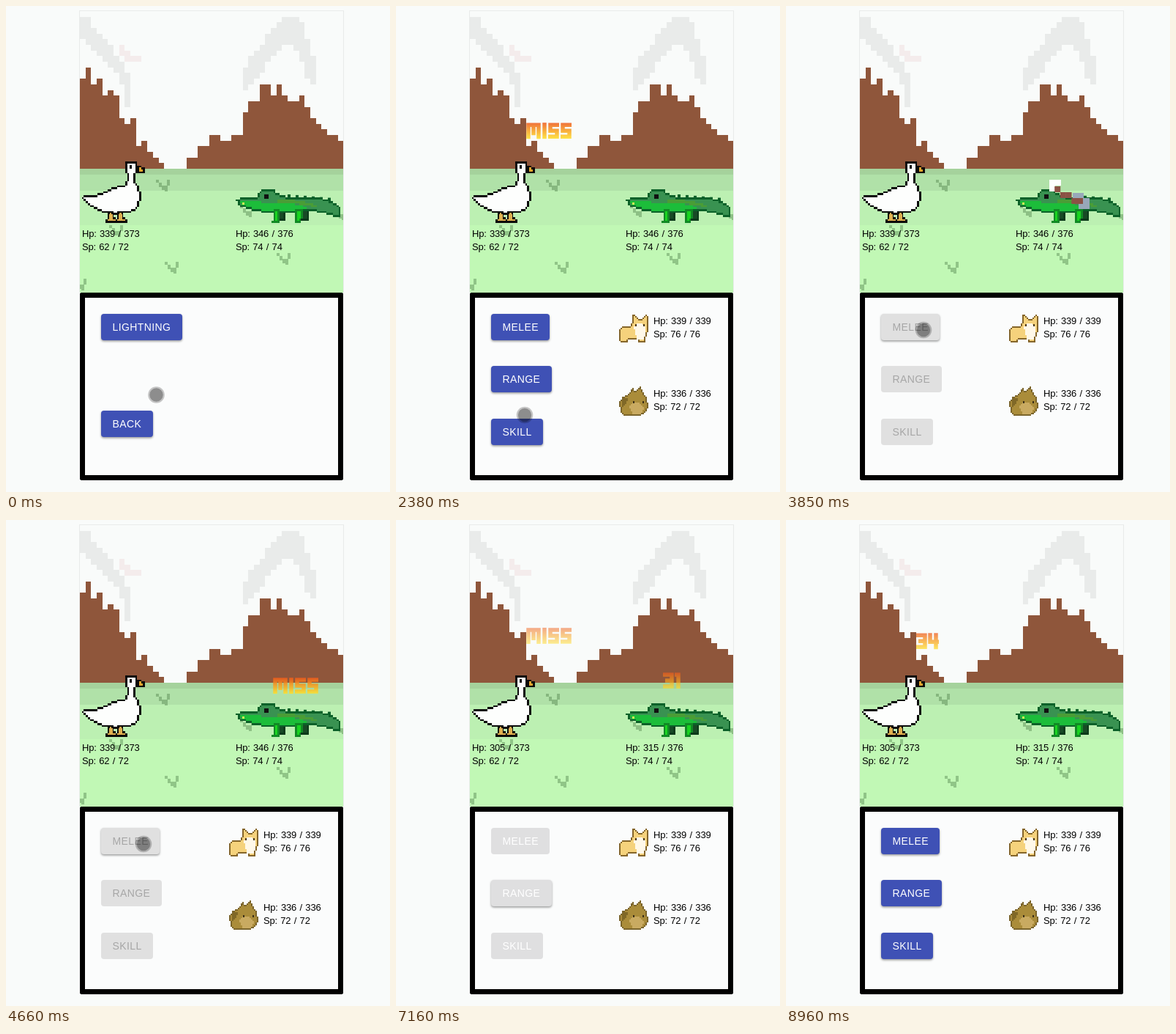
These frames come from a looping animation (525 px wide and 663 px high, 9.06 s). An HTML page with a canvas:

```html
<!DOCTYPE html>
<html lang="en">
<head>
<meta charset="utf-8">
<title>Pixel battle</title>
<style>
html, body { margin: 0; width: 100%; height: 100%; overflow: hidden; background: #f9fbfa; }
canvas { display: block; }
</style>
</head>
<body>
<canvas id="stage" width="525" height="663"></canvas>
<script>
const LOOP = 9060, W = 525, H = 663;
const LEFT = 101, TOP = 7, CELL = 7.68, DOT = 2.7;
const FONT = '"Liberation Sans", Arial, sans-serif';
const ctx = document.getElementById('stage').getContext('2d');

const clamp = v => Math.max(0, Math.min(1, v));
const lerp = (a, b, k) => a + (b - a) * k;
const smooth = u => { u = clamp(u); return u * u * (3 - 2 * u); };
const rect = (g, color, x, y, w, h) => { g.fillStyle = color; g.fillRect(x, y, w, h); };

// Rasterise a polygon ("x,y x,y ...") into square pixels with an optional outline.
function pixelPoly(g, size, points, fill, line) {
  const p = points.split(' ').map(s => s.split(',').map(Number));
  const inside = (x, y) => {
    let hit = false;
    for (let i = 0, j = p.length - 1; i < p.length; j = i++) {
      const [ax, ay] = p[i], [bx, by] = p[j];
      if ((ay > y) !== (by > y) && x < (bx - ax) * (y - ay) / (by - ay) + ax) hit = !hit;
    }
    return hit;
  };
  const snap = (v, origin) => origin + Math.round((v - origin) / size) * size;
  const xs = p.map(q => q[0]), ys = p.map(q => q[1]);
  for (let y = snap(Math.min(...ys), TOP); y < Math.max(...ys); y += size) {
    for (let x = snap(Math.min(...xs), LEFT); x < Math.max(...xs); x += size) {
      const cx = x + size / 2, cy = y + size / 2;
      if (!inside(cx, cy)) continue;
      const edge = line && !(inside(cx - size, cy) && inside(cx + size, cy) &&
        inside(cx, cy - size) && inside(cx, cy + size));
      const px = Math.round(x), py = Math.round(y);
      rect(g, edge ? line : fill, px, py, Math.round(x + size) - px, Math.round(y + size) - py);
    }
  }
}

function tuft(g, x, y) {
  const c = CELL / 2, color = 'rgba(70,120,65,.4)';
  for (let i = 0; i < 3; i++) {
    rect(g, color, Math.round(x + i * c), Math.round(y + i * c), 4, i ? 6 : 4);
    if (i < 2) rect(g, color, Math.round(x + (4 - i) * c), Math.round(y + 2 * i * c), 4, 8);
  }
}

function landscape(g) {
  rect(g, '#f9fbfa', 0, 0, W, H);
  g.strokeStyle = '#e9ebea';
  g.strokeRect(100.5, 6.5, 361, 385);

  g.save();
  g.beginPath();
  g.rect(LEFT, TOP, 360, 384);
  g.clip();

  const mist = '#e9ebea', pink = '#f4ecec', rock = '#8f563b';
  pixelPoly(g, CELL, '101,14 109,14 128,37 155,70 170,97 170,137 162,137 162,107 147,90 124,64 101,42', mist);
  pixelPoly(g, CELL, '377,14 400,14 410,37 416,60 424,76 424,107 416,107 400,68 385,48 370,62 354,84 331,114 324,114 324,91 339,64 362,37', mist);
  pixelPoly(g, CELL, '155,53 163,53 170,68 185,68 185,76 162,76 155,68', pink);
  pixelPoly(g, CELL, '101,106 113,84 118,105 128,98 133,122 143,114 151,120 156,152 166,160 174,152 ' +
    '182,191 189,183 197,199 205,206 216,215 216,222 101,222', rock);
  pixelPoly(g, CELL, '247,207 259,206 263,191 275,191 280,176 290,176 296,184 305,183 312,176 321,176 ' +
    '327,147 335,130 344,130 350,108 359,107 366,121 374,108 381,122 388,130 397,130 404,122 412,138 ' +
    '420,153 443,175 461,184 461,222 247,222', rock);

  for (const [color, y] of [['#a5d29c', 222], ['#b0e1a8', 230], ['#bcf0b2', 252], ['#c1f8b5', 299]]) {
    rect(g, color, LEFT, y, 360, 391 - y);
  }
  for (const [x, y] of [[205, 237], [217, 349], [370, 337], [141, 299], [320, 272], [91, 372], [447, 276]]) {
    tuft(g, x, y);
  }
  g.restore();

  rect(g, '#000', 102, 391, 358, 256);
  rect(g, '#000', 101, 392, 360, 254);
  rect(g, '#fbfcfc', 108, 398, 346, 242);
}

function goose(g) {
  const ink = '#0a0a0a';
  for (const x of [141, 154]) {
    pixelPoly(g, DOT, `${x - 1},281 ${x + 7},281 ${x + 7},293 ${x - 1},293`, '#dca94a', ink);
    pixelPoly(g, DOT, `${x - 5},291 ${x},288 ${x + 8},288 ${x + 11},292 ${x + 11},297 ${x - 5},297`, '#e0b050', ink);
    rect(g, '#e0b050', x, 284, 5, 9);
  }
  pixelPoly(g, DOT, '178,217 186,219 191,222 191,227 184,229 178,229', '#e5a52d', ink);
  pixelPoly(g, DOT, '166,211 177,211 180,216 180,226 177,231 177,241 183,247 184,266 180,275 171,282 ' +
    '150,284 132,282 118,275 109,269 105,263 105,260 112,257 126,257 138,252 151,246 162,245 165,238 165,230 163,222 163,214', '#fdfefd', ink);
  rect(g, ink, 169, 217, 3, 5);
}

function croc(g) {
  const ink = '#0c6129';
  for (const x of [371, 402]) {
    pixelPoly(g, DOT, `${x},276 ${x + 11},276 ${x + 11},292 ${x + 3},294 ${x},288`, '#174a25', '#0b3a1a');
  }
  for (let x = 385; x < 445; x += 11) rect(g, ink, x, 257 + (x - 385) / 12, 4, 6);
  pixelPoly(g, DOT, '315,264 322,261 343,260 347,252 353,249 365,249 371,256 378,259 400,261 420,260 ' +
    '438,263 451,270 458,277 458,287 453,289 440,284 420,280 404,280 385,283 355,282 335,278 318,272', '#399251', ink);
  pixelPoly(g, DOT, '318,267 340,266 362,270 390,269 414,275 400,279 382,280 352,279 332,275', '#1cbd3a');
  pixelPoly(g, DOT, '372,264 398,265 424,271 424,274 398,270 372,269', '#4a9d36');
  for (const x of [364, 394]) {
    pixelPoly(g, DOT, `${x + 2},277 ${x + 11},277 ${x + 11},290 ${x + 9},297 ${x - 1},297 ${x + 2},290`, '#19d420', '#118a25');
  }
  rect(g, '#111', 353, 257, 6, 6);
  rect(g, '#d8e85a', 323, 268, 3, 3);
}

function eyes(g, color, x, y, gap) {
  rect(g, color, x, y, 2, 3);
  rect(g, color, x + gap, y, 2, 3);
}

function corgi(g) {
  pixelPoly(g, 2, '305,441 310,437 321,437 323,431 322,423 325,420 331,427 337,427 342,420 345,424 ' +
    '344,446 342,452 342,460 333,460 331,456 318,456 316,460 307,460 305,453', '#f5d27c', '#84652a');
  pixelPoly(g, 2, '325,437 330,433 336,433 341,437 341,449 337,456 329,454', '#fff8e8');
  eyes(g, '#4a3820', 327, 434, 11);
}

function squirrel(g) {
  pixelPoly(g, 2, '305,541 310,533 319,529 323,520 327,527 334,519 338,527 343,535 345,546 341,555 ' +
    '334,559 312,559 307,554', '#aa8c3a', '#7b652c');
  pixelPoly(g, 2, '308,540 314,534 318,536 314,544 308,550', '#806827');
  pixelPoly(g, 2, '319,546 325,541 334,542 339,548 336,556 324,557', '#c9aa61');
  eyes(g, '#3c3018', 324, 539, 13);
}

function layer(...parts) {
  const c = document.createElement('canvas');
  c.width = W;
  c.height = H;
  const g = c.getContext('2d');
  parts.forEach(part => part(g));
  return c;
}
const scene = layer(landscape, goose, croc), team = layer(corgi, squirrel);

function text(str, x, y, size, color, letter, word = 0) {
  ctx.font = `${size}px ${FONT}`;
  ctx.letterSpacing = letter + 'px';
  ctx.wordSpacing = word + 'px';
  ctx.fillStyle = color;
  ctx.fillText(str, x, y);
}

function stats(x, y, hp, sp) {
  text('Hp: ' + hp, x, y, 13, '#000', -.2, 1);
  text('Sp: ' + sp, x, y + 18, 13, '#000', -.2, 1);
}

// off: 0 = enabled colour, 1 = disabled colour.
function button(label, y, off = 0, disabled = false, raised = true) {
  const size = 14, pad = 15.5, gap = .4;
  ctx.font = `${size}px ${FONT}`;
  ctx.letterSpacing = gap + 'px';
  const width = Math.round(ctx.measureText(label).width + 2 * pad);
  ctx.save();
  if (raised) {
    ctx.shadowColor = 'rgba(0,0,0,.4)';
    ctx.shadowBlur = 3;
    ctx.shadowOffsetY = 1.5;
  }
  ctx.fillStyle = `rgb(${[63, 81, 181].map(v => Math.round(lerp(v, 224, off)))})`;
  ctx.beginPath();
  ctx.roundRect(130, y, width, 36, 4);
  ctx.fill();
  ctx.restore();
  text(label, 130 + pad, y + 23, size, disabled ? 'rgba(0,0,0,.26)' : '#fff', gap);
}

// Each pick locks the menu; the enemy answers REPLY later.
const MENU_AT = 2200, LOCK = 1600, REPLY = 1910, FADE = 250;
const MELEE_AT = 3390, RANGE_AT = 5550;

function menu(t) {
  if (t < MENU_AT) {
    button('LIGHTNING', 420);
    button('BACK', 552);
    return;
  }
  const pickedAt = t < RANGE_AT ? MELEE_AT : RANGE_AT;
  const picked = t < MELEE_AT ? '' : t < RANGE_AT ? 'MELEE' : 'RANGE';
  const since = t - pickedAt;
  const disabled = since >= 0 && since < LOCK;
  const off = 1 - (1 - smooth(since / FADE)) ** 1.3 - smooth((since - LOCK) / FADE);
  ['MELEE', 'RANGE', 'SKILL'].forEach((label, i) =>
    button(label, Math.round(420 + i * 71.4), off, disabled, off < .1 || label === picked));
  ctx.drawImage(team, 0, 0);
  stats(352, 434, '339 / 339', '76 / 76');
  stats(352, 533, '336 / 336', '72 / 72');
}

// A star whose inner cells alternate between diagonals and straight rays.
function burst(age) {
  const diagonal = Math.floor(age / 160) % 2;
  for (let i = 0; i < 4; i++) {
    rect(ctx, '#fff', -36, -36, 8, 8);
    if (diagonal) rect(ctx, '#fff', -28, -28, 8, 8);
    else rect(ctx, '#fff', -4, -36, 8, 16);
    ctx.rotate(Math.PI / 2);
  }
}

function axe() {
  const steel = '#98a8b9', wood = '#8b5245';
  rect(ctx, '#fff', 20, -30, 8, 16);
  rect(ctx, '#fff', 12, -30, 8, 8);
  rect(ctx, steel, -27, -5, 15, 15);
  rect(ctx, steel, -19, -12, 15, 15);
  for (let x = -18; x < 20; x += 7.7) rect(ctx, wood, x, -5 - Math.floor((x + 18) / 15) * 8, 8, 8);
}

const fighters = {
  goose: { x: 160.5, y: 267, label: [178, 166] },
  croc: { x: 418, y: 252, label: [365, 222] }
};
const attack = (at, by, weapon, word) => ({ at, weapon, word,
  from: fighters[by], to: fighters[by === 'goose' ? 'croc' : 'goose'] });
const attacks = [
  attack(1115, 'croc', burst, 'MISS'),
  attack(MELEE_AT, 'goose', axe, 'MISS'),
  attack(MELEE_AT + REPLY, 'croc', axe, 'MISS'),
  attack(RANGE_AT, 'goose', burst, '31'),
  attack(RANGE_AT + REPLY, 'croc', burst, '34')
];
const FLIGHT = 490, HIT = 935, FLOAT = 1700;

function fly({ from, to, weapon }, age) {
  if (age < 0 || age > FLIGHT + 60) return;
  ctx.save();
  ctx.translate(Math.round(lerp(from.x, to.x, clamp(age / FLIGHT) ** 2)), from.y);
  if (to.x > from.x) ctx.scale(-1, 1);
  weapon(age);
  ctx.restore();
}

const glyphs = {
  M: [22, 'M3 22V3H17V22M10 3V17'], I: [8, 'M3 0V22'], S: [17, 'M15 3H3V11H12V19H0'],
  3: [16, 'M0 3H12V19H0M3 11H12'], 1: [8, 'M0 3H5V22'], 4: [15, 'M3 0V12H15M11 0V22']
};

// Damage words drift up and fade.
function popup({ word, to }, age) {
  const u = age / FLOAT;
  if (u < 0 || u >= 1) return;
  const fill = ctx.createLinearGradient(0, 0, 0, 22);
  ['#ee5a1c', '#f8a01e', '#ffe02a'].forEach((color, i) => fill.addColorStop(i / 2, color));
  ctx.save();
  ctx.globalAlpha = 1 - u ** 1.2;
  ctx.translate(to.label[0], to.label[1] - 35 * u);
  ctx.strokeStyle = fill;
  ctx.lineWidth = 5.5;
  for (const ch of word) {
    const [step, path] = glyphs[ch];
    ctx.stroke(new Path2D(path));
    ctx.translate(step, 0);
  }
  ctx.restore();
}

// Pointer stops: arrival time and place; every move takes MOVE ms.
const MOVE = 420;
const stops = [[0, 205.5, 530.5], [420, 192, 564], [1100, 176, 558], [3050, 188, 442], [5330, 180, 514], [7100, 483, 676]];

function pointer(t) {
  let [, x, y] = stops[0];
  for (const [at, sx, sy] of stops) {
    const k = smooth((t - at) / MOVE + 1);
    x = lerp(x, sx, k);
    y = lerp(y, sy, k);
  }
  for (const [r, alpha] of [[11.3, .22], [9.2, .28]]) {
    ctx.fillStyle = `rgba(0,0,0,${alpha})`;
    ctx.beginPath();
    ctx.arc(x, y, r, 0, 7);
    ctx.fill();
  }
}

function frame(now) {
  const t = now % LOOP;
  ctx.drawImage(scene, 0, 0);
  stats(104, 315, `${t < RANGE_AT + LOCK ? 339 : 305} / 373`, '62 / 72');
  stats(314, 315, `${t < RANGE_AT ? 346 : 315} / 376`, '74 / 74');
  menu(t);
  for (const a of attacks) fly(a, t - a.at);
  for (const a of attacks) popup(a, t - a.at - HIT);
  pointer(t);
}

const start = performance.now();
(function tick() {
  frame(performance.now() - start);
  requestAnimationFrame(tick);
})();
</script>
</body>
</html>
```
